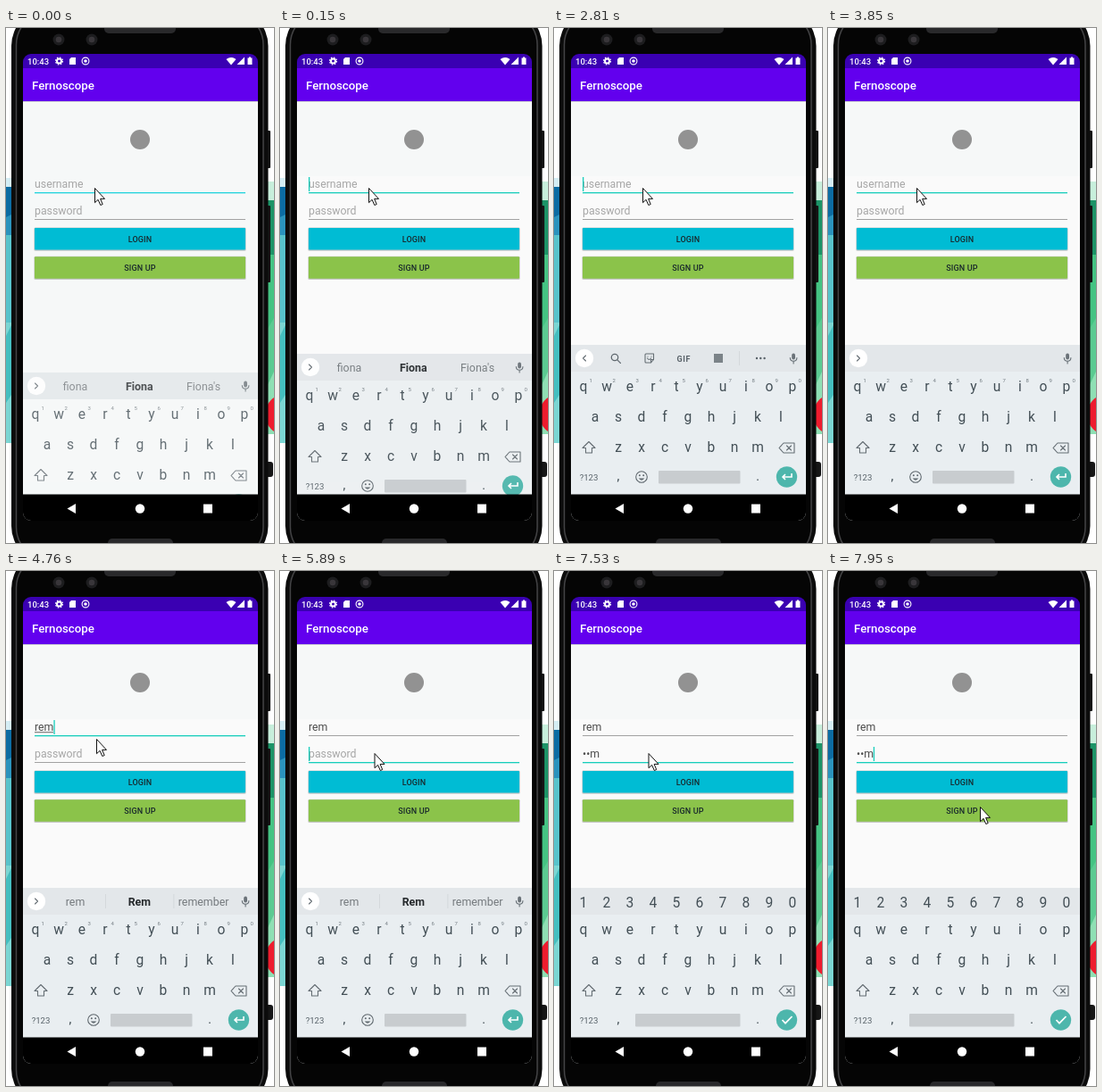
Write an HTML page that moves like this. It is 300 by 577 pixels and loops after 8000 ms.

```html
<!DOCTYPE html>
<html lang="en">
<head>
<meta charset="utf-8">
<title>Login screen</title>
<style>
html, body { margin: 0; width: 100%; height: 100%; overflow: hidden; background: #fff; }
svg { display: block; width: 300px; height: 577px; font-family: Roboto, "Noto Sans", sans-serif; }
.mid { text-anchor: middle; }
.medium { font-weight: 500; }
.field { font-size: 12.3px; }
.word { font-size: 12.4px; text-anchor: middle; }
.line { fill: none; stroke: #656e74; stroke-width: 1.1; stroke-linecap: round; stroke-linejoin: round; }
</style>
</head>
<body>
<svg id="stage" viewBox="0 0 300 577" xmlns="http://www.w3.org/2000/svg"></svg>
<script>
const stage = document.getElementById('stage');
const LOOP = 8000;

const rect = (x, y, w, h, fill, extra = '') =>
  `<rect x="${x}" y="${y}" width="${w}" height="${h}" fill="${fill}" ${extra}/>`;
const circle = (x, y, r, fill, extra = '') =>
  `<circle cx="${x}" cy="${y}" r="${r}" fill="${fill}" ${extra}/>`;
const path = (d, extra = 'class="line"') => `<path d="${d}" ${extra}/>`;
const text = (x, y, str, fill, extra = '') =>
  `<text x="${x}" y="${y}" fill="${fill}" ${extra}>${str}</text>`;
const group = (id, body, extra = '') => `<g id="${id}" ${extra}>${body}</g>`;

function backdrop() {
  return rect(0, 168, 12, 12, '#d5eef5') + rect(0, 178, 12, 54, '#0c6ca3')
    + path('M0 212L12 206V240H0Z', 'fill="#2b93bd"')
    + rect(0, 232, 12, 98, '#58c3cb') + rect(0, 330, 12, 135, '#7bd6d3')
    + path('M0 345L10 325V405L0 420Z', 'fill="#45bfc0"')
    + rect(288, 172, 12, 22, '#c8efdc') + rect(288, 193, 12, 62, '#1c9467')
    + rect(288, 254, 12, 92, '#45c483') + rect(288, 345, 12, 110, '#8fe0b4')
    + path('M288 345L300 325V385L288 410Z', 'fill="#5ccb92"')
    + circle(313, 433, 23, '#ee1c2e') + rect(290, 486, 9, 17, '#161616', 'rx="3"');
}

function phone() {
  return rect(290, 115, 6, 42, '#161616', 'rx="1"') + rect(290, 199, 6, 86, '#161616', 'rx="1"')
    + rect(6, -22, 287.5, 622, '#0c0c0c', 'rx="42"')
    + rect(11.5, -18, 276.5, 614, '#050505', 'rx="37" stroke="#444446" stroke-width="1.5"')
    + rect(110, -6, 80, 12, '#29292b', 'rx="5"')
    + [59, 96].map(x => circle(x, 13, 6.5, '#1d1d1f') + circle(x, 13, 3.3, '#39363a')).join('')
    + rect(114, 572, 73, 12, '#29292b', 'rx="5"');
}

function statusBar() {
  const white = 'fill="#fff"';
  return rect(19, 29, 263, 17, '#3a00b2') + rect(19, 45, 263, 37, '#6200ee')
    + rect(19, 82, 263, 1, '#000', 'opacity=".15"')
    + text(24, 40.7, '10:43', '#fff', 'font-size="9.5" class="medium"')
    + circle(59.5, 37, 2.5, 'none', 'stroke="#fff" stroke-width="2"')
    + circle(59.5, 37, 4, 'none', 'stroke="#fff" stroke-width="1.2" stroke-dasharray="1.6 1.54"')
    + path('M73 33H78V41H71V35Z', white)
    + circle(89, 37, 3.9, 'none', 'stroke="#fff" stroke-width="1.1"') + circle(89, 37, 1.8, '#fff')
    + path('M246.5 35Q252 31 257.5 35L252 41.5Z', white)
    + path('M267 32.5V41H258.5Z', white)
    + path('M271 33.5H272V32.5H274V33.5H275.5V41H270.5V33.5Z', white)
    + text(29, 69, 'Fernoscope', '#fff', 'font-size="13.3" class="medium"');
}

function button(y, label, fill) {
  return rect(31.4, y - 0.6, 237.2, 26.4, '#000', 'opacity=".2" rx="1.5"')
    + rect(32, y, 236, 24.5, fill, 'rx="1"')
    + text(150, y + 15.6, label, '#18282c', 'font-size="9" letter-spacing=".15" class="mid medium"');
}

function form() {
  return rect(19, 82, 263, 442, '#fafafa', 'id="page"') + rect(19, 82, 263, 84, '#f6f8f8')
    + circle(150, 125, 11, '#929292')
    + text(32, 179.3, '', '#444', 'id="user" class="field"')
    + text(32, 209.4, '', '#444', 'id="pass" class="field"')
    + rect(32, 180.3, 21, 0.9, '#555', 'id="composing"')
    + rect(32, 184, 236, 1, '#999', 'id="userLine"') + rect(32, 214, 236, 1, '#999', 'id="passLine"')
    + rect(0, 0, 1.3, 16, '#16cdbb', 'id="caret"')
    + button(224, 'LOGIN', '#00bcd4') + button(256.3, 'SIGN UP', '#8bc34a');
}

const keyRow = (letters, x, y) => [...letters].map((c, i) =>
  text(x + i * 26, y, c, '#434f56', 'font-size="15.6" class="mid"')).join('');

function suggestions(id, words) {
  return group(id, words.map((w, i) => text(77.5 + i * 71.8, 375, w, i === 1 ? '#25292c' : '#74797d',
    `class="word" ${i === 1 ? 'font-weight="700"' : ''}`)).join('')
    + (id === 'completions' ? rect(111, 362, 0.8, 16, '#d0d5d8') + rect(187.5, 362, 0.8, 16, '#d0d5d8') : ''));
}

function toolbar() {
  return group('tools',
    circle(68, 369, 3.7, 'none', 'stroke="#5f686e" stroke-width="1.3"') + path('M71 372L74.5 375.5')
    + path('M103 365H111.5V371.5L108.5 375H103Q102 375 102 374V366Q102 365 103 365ZM108.5 375V371.5H111.5M104.5 370Q106.5 373 108.5 370M105 368V368.1M109 368V368.1')
    + text(145.3, 373.5, 'GIF', '#596269', 'font-size="9" font-weight="700" letter-spacing=".6" class="mid"')
    + rect(179, 365, 10, 10, '#7b8388')
    + rect(207, 362, 0.8, 16, '#d0d5d8')
    + [227, 231.3, 235.6].map(x => circle(x, 370, 1.2, '#596269')).join(''));
}

function keyboard() {
  const strip = circle(34, 370, 10.2, '#fff') + path('', 'class="line" id="chevron"')
    + rect(266.2, 364.5, 3.8, 7, '#6a7278', 'rx="1.9"') + path('M264.3 369.5Q264.5 373.3 268.1 373.3T271.9 369.5M268.1 373.5V376')
    + toolbar() + suggestions('defaults', ['fiona', 'Fiona', "Fiona's"])
    + suggestions('completions', ['rem', 'Rem', 'remember']);
  const hints = [...'1234567890'].map((c, i) =>
    text(41.3 + i * 26, 396.7, c, '#737c82', 'font-size="6" class="mid"')).join('');
  const textOnly = strip + hints
    + circle(98, 503, 6.3, 'none', 'stroke="#5f686e" stroke-width="1.1"')
    + path('M94.6 504.5Q98 508.8 101.4 504.5Z', 'fill="#5f686e"')
    + circle(95.8, 501.2, 1, '#5f686e') + circle(100.2, 501.2, 1, '#5f686e')
    + rect(117, 496, 91.5, 14.5, '#c8cccf', 'rx="1"')
    + path('M266 499V503H256M259 500L256 503L259 506', 'fill="none" stroke="#fff" stroke-width="1.6"');
  const passwordOnly = keyRow('1234567890', 33, 376.5)
    + rect(91, 496, 117.5, 14.5, '#c8cccf', 'rx="1"')
    + path('M255.5 503L259 506.7L266.5 499', 'fill="none" stroke="#fff" stroke-width="1.7"');
  return group('keyboard',
    rect(19, 355, 263, 200, '#e9eef1', 'id="keyBed"') + rect(19, 355, 263, 30, '#e3e7ea')
    + keyRow('qwertyuiop', 33, 407.3) + keyRow('asdfghjkl', 46, 441) + keyRow('zxcvbnm', 72, 475)
    + path('M39 463.5L46 470.5H42.5V476H35.5V470.5H32Z')
    + path('M257 465H269V476H257L252 470.5ZM260.5 468L265.5 473M265.5 468L260.5 473')
    + text(39, 506.5, '?123', '#59636a', 'font-size="9.6" class="mid"')
    + text(72, 506.5, ',', '#37434a', 'font-size="14" class="mid"')
    + text(228, 506.5, '.', '#37434a', 'font-size="14" class="mid"')
    + circle(260.5, 503, 11.7, '#4db6ac')
    + group('textKeys', textOnly) + group('passwordKeys', passwordOnly));
}

function navBar() {
  return rect(19, 522.5, 263, 30, '#000') + path('M68.5 538.5L78 533V544Z', 'fill="#fff"')
    + circle(150, 538.5, 5.2, '#fff') + rect(221, 533.5, 10, 10, '#fff');
}

stage.innerHTML = '<clipPath id="screen"><rect x="19" y="29" width="263" height="523" rx="9"/></clipPath>'
  + backdrop() + phone()
  + `<g clip-path="url(#screen)">${form()}${keyboard()}${statusBar()}${navBar()}</g>`
  + path('M0 0V16.2L3.6 12.8L6.3 19L8.7 18L6.1 11.9H11Z',
    'id="pointer" fill="#fff" stroke="#111" stroke-width="1" stroke-linejoin="round"');

const el = Object.fromEntries([...stage.querySelectorAll('[id]')].map(n => [n.id, n]));
const show = (node, on) => node.setAttribute('display', on ? 'inline' : 'none');
const move = (node, x, y) => node.setAttribute('transform', `translate(${x} ${y})`);

// Value of the last [time, value] step that has begun.
const at = (steps, t) => steps.reduce((value, [start, next]) => t >= start ? next : value, steps[0][1]);

const lift = [[0, 31], [150, 10], [320, 0]];
const keyboardOpacity = [[0, 0.8], [150, 0.95], [320, 1]];
const keyBedFill = [[0, '#f6f8f8'], [150, '#ecf0f2'], [320, '#e9eef1']];
const pageFill = [[0, '#f6f8f8'], [150, '#fafafa']];
const strip = [[0, 'defaults'], [320, 'tools'], [3850, ''], [4130, 'completions']];
const userText = [[0, ''], [4130, 're'], [4380, 'rem']];
const passText = [[0, ''], [6440, 'r'], [6730, '•e'], [7000, '••m']];
const caretX = [[0, 32], [4130, 43], [4380, 53.4], [5630, 32], [6440, 35.8], [6730, 43.3], [7000, 50.8]];
const caretOn = [[0, 0], [150, 1], [490, 0], [910, 1], [1310, 0], [1850, 1], [2280, 0], [2810, 1], [3310, 0],
  [4130, 1], [4900, 0], [5320, 1], [6140, 0], [6440, 1], [7530, 0], [7950, 1]];
const pointer = [[0, [99.5, 179.5]], [4760, [101.5, 188.5]], [4900, [104.5, 198.5]], [5050, [106, 204.5]],
  [7670, [128, 226]], [7810, [156, 252]], [7950, [170.5, 264.5]]];

function setField(node, value, hint) {
  node.textContent = value || hint;
  node.setAttribute('fill', value ? '#4c4c4c' : '#a6a6a6');
}

function setLine(node, focused, color) {
  node.setAttribute('fill', focused ? color : '#999');
  node.setAttribute('height', focused ? 1.3 : 0.9);
}

function render(t) {
  const onPassword = t >= 5630;
  const numeric = t >= 6140;
  const bar = at(strip, t);
  move(el.keyboard, 0, at(lift, t));
  el.keyboard.setAttribute('opacity', at(keyboardOpacity, t));
  el.keyBed.setAttribute('fill', at(keyBedFill, t));
  el.page.setAttribute('fill', at(pageFill, t));
  show(el.textKeys, !numeric);
  show(el.passwordKeys, numeric);
  for (const id of ['defaults', 'tools', 'completions']) show(el[id], bar === id);
  el.chevron.setAttribute('d', bar === 'tools' ? 'M35.5 367L32.5 370L35.5 373' : 'M32.5 367L35.5 370L32.5 373');
  setField(el.user, at(userText, t), 'username');
  setField(el.pass, at(passText, t), 'password');
  show(el.composing, t >= 4130 && !onPassword);
  el.composing.setAttribute('width', t < 4380 ? 10.5 : 21);
  setLine(el.userLine, !onPassword, t < 150 ? '#1fd3dc' : '#16cdbb');
  setLine(el.passLine, onPassword, '#16cdbb');
  show(el.caret, at(caretOn, t));
  move(el.caret, at(caretX, t), onPassword ? 197 : 167);
  move(el.pointer, ...at(pointer, t));
}

const start = performance.now();
function tick() {
  render((performance.now() - start) % LOOP);
  requestAnimationFrame(tick);
}
tick();
</script>
</body>
</html>
```
